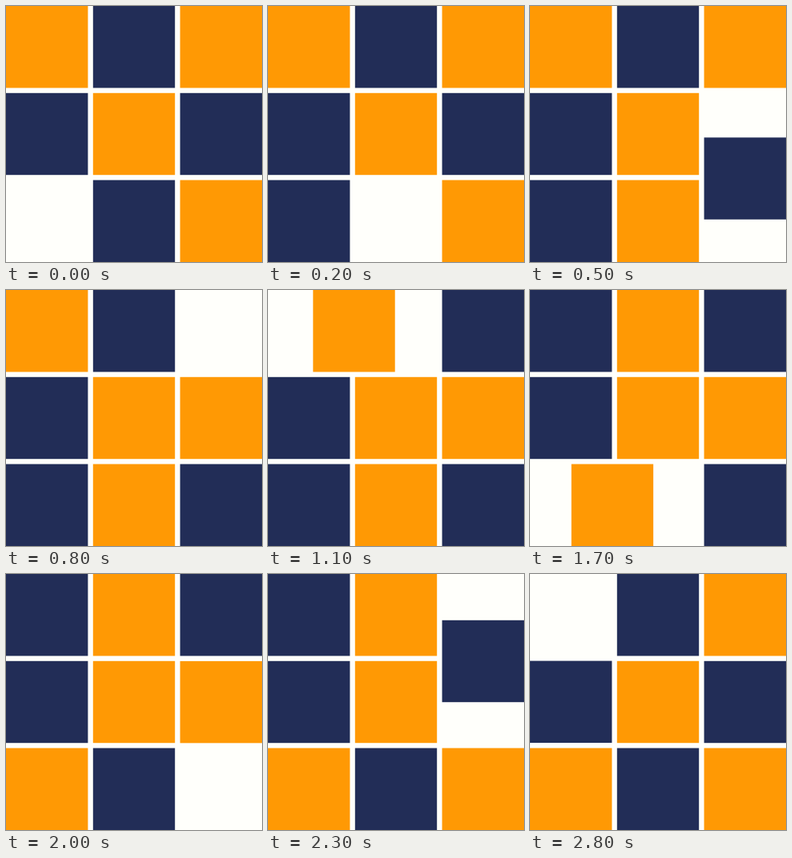
These frames come from a looping animation (320 px wide and 320 px high, 2.9 s). An HTML page with a canvas:

```html
<!DOCTYPE html>
<html lang="en">
<head>
<meta charset="utf-8">
<title>Sliding squares</title>
<style>
  html, body { margin: 0; height: 100%; overflow: hidden; background: #fffffb; }
  canvas { display: block; }
</style>
</head>
<body>
<canvas id="stage" width="320" height="320"></canvas>
<script>
const ctx = document.getElementById('stage').getContext('2d');
const ORANGE = '#ff9904', NAVY = '#222d57', PAPER = '#fffffb';
const STAGE = 320, SIZE = STAGE * 0.32, PITCH = STAGE * 0.34, TILES = 7;
const LOOP = 2900, TICK = 100, MOVE = 199.7, LEAD = 0.7;

// Ring cells [column, row] in the order the gap visits them.
const ring = [[0, 2], [1, 2], [2, 2], [2, 1], [2, 0], [1, 0], [0, 0], [0, 1]];
const cell = i => ring[(i + ring.length) % ring.length];
const ease = x => x * x * (3 - 2 * x);

function drawTile(col, row, color) {
  ctx.fillStyle = color;
  ctx.fillRect(col * PITCH, row * PITCH, SIZE, SIZE);
}

// The tiles take turns stepping one cell back into the gap.
function drawRingTile(i, moves) {
  const turn = Math.floor((moves - i) / TILES);
  const progress = ease(Math.min(moves - i - turn * TILES, 1));
  const from = cell(i + 1 - turn), to = cell(i - turn);
  const mix = axis => from[axis] + (to[axis] - from[axis]) * progress;
  drawTile(mix(0), mix(1), i % 2 ? ORANGE : NAVY);
}

function draw(time) {
  const moves = (time + LEAD) / MOVE;
  ctx.fillStyle = PAPER;
  ctx.fillRect(0, 0, STAGE, STAGE);
  drawTile(1, 1, ORANGE);
  for (let i = 0; i < TILES; i++) drawRingTile(i, moves);
}

const start = performance.now();
function frame() {
  const time = (performance.now() - start) % LOOP;
  draw(Math.floor(time / TICK) * TICK);
  requestAnimationFrame(frame);
}
frame();
</script>
</body>
</html>
```
